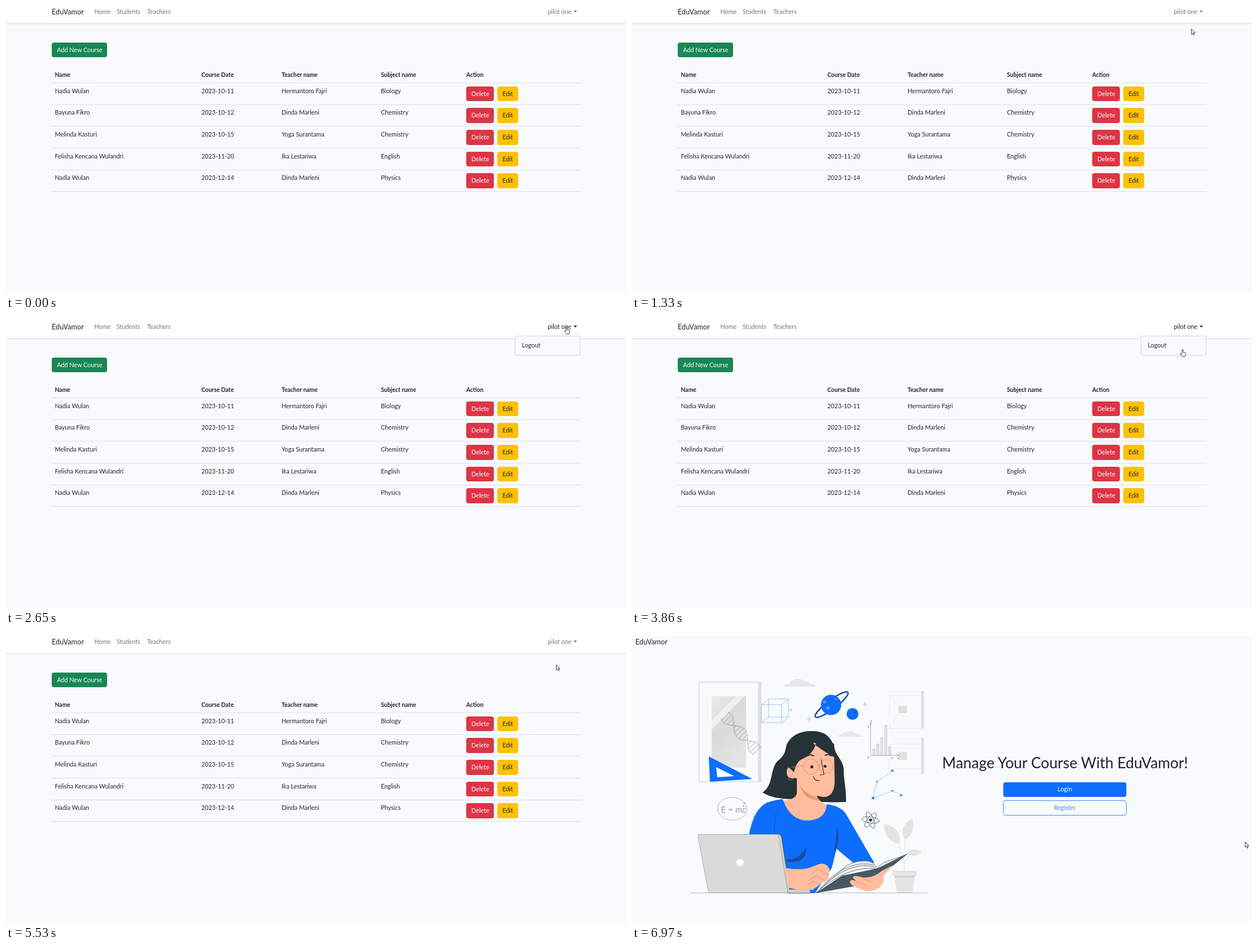
Write an HTML page that moves like this. It is 1098 by 510 pixels and loops after 7640 ms.

```html
<!DOCTYPE html>
<html lang="en">
<head>
<meta charset="utf-8">
<title>EduVamor</title>
<style>
  html, body { margin: 0; width: 100%; height: 100%; overflow: hidden; background: #f8fafc; }
  svg { display: block; width: 1098px; height: 510px; font: 10.8px Lato, sans-serif; }
  text { fill: #212529; white-space: pre; }
  .brand { font-size: 12.7px; }
  .muted { fill: #000; fill-opacity: .55; }
  .head { font-size: 10.4px; font-weight: bold; }
  .light { fill: #fff; }
  .pen { fill: none; stroke: #455a64; stroke-width: .8; stroke-linejoin: round; stroke-linecap: round; }
  .thin { stroke: #78868d; stroke-width: .6; }
  .faint { fill: none; stroke: #e8eaec; }
  .gray { fill: #e0e0e0; }
  .blue { fill: #0d6efd; }
  .navy { fill: #174da6; }
  .skin { fill: #ffbd9d; }
  .ink { fill: #263238; }
  .wire { fill: none; stroke: #5f9ffb; stroke-width: .6; }
  .pointer path { fill: #fff; stroke: #222831; stroke-width: .9; stroke-linejoin: round; }
</style>
</head>
<body>
<svg viewBox="0 0 1098 510">
  <defs>
    <linearGradient id="shade" x2="0" y2="1">
      <stop offset="0" stop-color="#000" stop-opacity=".08"/>
      <stop offset="1" stop-color="#000" stop-opacity="0"/>
    </linearGradient>
    <linearGradient id="glass" x2=".6" y2="1">
      <stop offset="0" stop-color="#ececec"/>
      <stop offset=".45" stop-color="#dadada"/>
      <stop offset="1" stop-color="#e4e4e4"/>
    </linearGradient>
  </defs>
  <rect width="1098" height="510" fill="#f8fafc"/>

  <g id="courses">
    <rect width="1098" height="30" fill="#fff"/>
    <rect y="30" width="1098" height="4" fill="url(#shade)"/>
    <text x="81" y="15" class="brand">EduVamor</text>
    <text x="156.5" y="14" class="muted">Home</text>
    <text x="196" y="14" class="muted">Students</text>
    <text x="250" y="14" class="muted">Teachers</text>
    <g id="account">
      <text x="959.5" y="14" style="fill:#000">pilot one</text>
      <path d="M1005.2 8.3h6.2l-3.1 3.2z"/>
    </g>
    <g id="table"></g>
    <g id="menu">
      <rect x="901.5" y="26.5" width="115" height="34.5" rx="4" fill="#f8fafc" stroke="#d0d3d6"/>
      <text x="913.5" y="47">Logout</text>
    </g>
  </g>

  <g id="welcome">
    <text x="6" y="15" class="brand">EduVamor</text>
    <text x="767" y="235" font-size="26.4" text-anchor="middle">Manage Your Course With EduVamor!</text>
    <rect x="657.5" y="260" width="218" height="26" rx="4" class="blue"/>
    <text x="766.5" y="276" text-anchor="middle" class="light">Login</text>
    <rect x="657.5" y="292.5" width="218" height="26" rx="4" fill="none" stroke="#3d8bfd"/>
    <text x="766.5" y="308.5" text-anchor="middle" style="fill:#3d8bfd">Register</text>

    <!-- wall -->
    <path class="faint" stroke-width="3" d="M118.500 82H228V259H118.500Z"/>
    <path class="gray" d="M223 82h6v177h-6z"/>
    <rect x="141" y="107" width="61" height="127" fill="url(#glass)"/>
    <path fill="#f0f0f0" d="M141 150l43-43h15l-58 59z"/>
    <path class="faint" d="M456 106h57v58h-57zM456 192h57v44h-57zM456 106l16 18M456 164l16-26M456 192l16 14"/>
    <path class="gray" d="M472 124h15v13h-15zM472 206h15v14h-15zM512 98h5v66h-5zM512 180h5v66h-5z"/>
    <path fill="#e7e8ea" d="M267 90q5-6 12-6 5-8 14-8 9 0 13 6 6-3 10 3 8 0 12 5zM364 179q5-5 9-5 5-6 12-5 7 0 9 4 9 0 14 6z"/>
    <path fill="#d5dade" d="M412.500 116l1.500 4 4 1.500-4 1.500-1.500 4-1.500-4-4-1.500 4-1.500zM314 142l1.300 4 4 1.300-4 1.300-1.300 4-1.300-4-4-1.300 4-1.300z"/>
    <path id="helix" class="pen thin"/>
    <path class="blue" fill-rule="evenodd" d="M136 214l77 40-75 5zM149 233l2 18 30-2z"/>
    <path class="wire" d="M229 122h36v32h-36zM242 112h35v32h-35zM229 122l13-10M265 122l12-10M265 154l12-10M229 154l13-10"/>
    <text x="279" y="134" font-size="9" font-style="italic" style="fill:#9dbdf0">n</text>

    <!-- planets -->
    <ellipse cx="353.500" cy="122" rx="36" ry="8" transform="rotate(-37 353.500 122)" fill="none" stroke="#174da6" stroke-width="2.600"/>
    <circle cx="352.500" cy="122.500" r="18" class="blue"/>
    <g fill="#5a9bff"><circle cx="341" cy="117" r="2.800"/><circle cx="347" cy="128" r="3"/><circle cx="360" cy="112" r="1.800"/></g>
    <circle cx="390.500" cy="138.500" r="10.500" class="blue"/>
    <g class="navy"><circle cx="396" cy="135" r="2"/><circle cx="388" cy="144" r="1.500"/></g>

    <!-- diagrams -->
    <path class="pen thin" d="M422.500 154v58H473M420.500 158l2-4 2 4M469 210l4 2-4 2M427 212v-11h3v11M434 212v-20h3v20M441 212v-31h3v31M448 212v-53h3v53M455 212v-15h3v15"/>
    <g font-size="5.500" opacity=".7"><text x="422" y="153">y</text><text x="417" y="163">1</text><text x="417" y="218">0</text><text x="459" y="219">4</text><text x="470" y="219">x</text></g>
    <path class="wire" d="M461 239.500L434 259 427 288 461 275 476.500 283"/>
    <g id="stars" class="blue"></g>
    <path class="pen thin" d="M152 309c-3-30 49-28 51-4 4 29-49 29-51 4z"/>
    <g font-weight="300" opacity=".75"><text x="157.500" y="313.500" font-size="15">E = mc</text><text x="195" y="303" font-size="9">2</text></g>
    <g class="pen" transform="translate(422.500 327)">
      <ellipse rx="15.500" ry="5.500" transform="rotate(8)"/>
      <ellipse rx="15.500" ry="5.500" transform="rotate(68)"/>
      <ellipse rx="15.500" ry="5.500" transform="rotate(128)"/>
      <circle r="2.500" class="ink"/>
    </g>

    <!-- plant and desk -->
    <path class="faint" stroke-width="1.500" d="M483 417Q479 380 463 348M483 417Q478 380 489 340M483 405Q484 390 500 385"/>
    <path fill="#e4e4e4" d="M474 369c-16 0-29-18-28-35 17 2 32 15 28 35zM483 361c-10-14 0-31 13-36 4 14 1 31-13 36zM486 388q10-14 27-5-10 12-27 5zM461 417h43v9h-43zM465 426h36l-4 31h-28z"/>
    <path fill="#cfcfcf" d="M465 426h36l-.5 3h-35z"/>
    <path d="M104 456.500H524" stroke="#a4abae" stroke-width=".8"/>

    <!-- reader -->
    <path class="ink" d="M231 278c20-12 13-42 27-56 15-12 13-20 16-29 8-18 27-25 46-24 23 0 34 12 39 32 3 13 15 20 16 36 0 21 5 38 4 58q-48 2-92-5-38 0-56-12z"/>
    <path class="skin" d="M292 248v32q-3 11-26 13 15 37 46 36 32-3 34-29-18-6-19-20z"/>
    <path fill="#eb9a72" d="M297 265q13 18 31 21l3 7q-27-2-34-28z"/>
    <path class="blue" d="M207 354q8-46 32-58 14-5 28-6 13 38 45 38 31-2 33-29 26 3 35 19l49 85-29 7-38-32-8 34-30 45h-47l-19-103z"/>
    <path class="navy" d="M271 397q26 2 37-23 3 28-26 28-8 0-11-5zM363 337q6 25-3 47l-2-7q4-13 5-40z"/>
    <path class="pen" style="stroke:#174da6" d="M253 352q-3-34 8-50M245 299q7-6 14-7"/>
    <path class="skin" d="M323 190q31 4 35 23l1 47q-2 27-20 26-22-2-40-26l-9-8q-16 4-16-10 0-11 11-10 17-13 23-36z"/>
    <path class="ink" d="M327 184q-3 25-26 35-10 4-14 23l-9-8 2-38 24-20zM320 190q19 15 39 26l-1-24-21-15z"/>
    <g class="pen" style="stroke:#cf9273">
      <circle cx="317" cy="232" r="13.500"/><circle cx="344" cy="232" r="12"/>
      <path d="M330 230q1-2 2 0M303 231l-20 2M278 239q6-1 7 7"/>
      <circle cx="281" cy="252" r="4"/>
    </g>
    <g class="ink"><circle cx="318.500" cy="232.500" r="2.700"/><circle cx="342" cy="231.500" r="2.600"/></g>
    <path class="pen" style="stroke:#263238;stroke-width:1.800" d="M308 214q7-5 14-1M342 212q6-3 11 1"/>
    <path class="pen" style="stroke:#263238;stroke-width:1.200" d="M335 220l5 26-7 1M321 249q2 9 11 8"/>

    <!-- laptop -->
    <path fill="#cfcfcf" d="M255 352h5q4 1 5 6l14 92h34q4 3 3 7h-40z" stroke="#37474f" stroke-width=".8"/>
    <path fill="#dadada" stroke="#8d969b" stroke-width=".7" d="M119 352.500H255q4 0 5 5l16 99H138q-2 0-3-4L117 357q0-4 2-4.500z"/>
    <circle cx="191.500" cy="402.500" r="6.300" fill="#fff"/>

    <!-- hands and book -->
    <path class="skin" d="M271 412q26 5 43 0l18-7q13-3 18 10l-2 16-13 9-15 11q-24 2-43-4z"/>
    <path class="pen" style="stroke:#db835f" d="M318 423l12-9 18 11M315 433l11-7 16 9M312 441l10-5 11 7"/>
    <path fill="#455a64" d="M325 457l47-31 62-13 53-25-44 36-45 20z"/>
    <path fill="#f1f2f1" stroke="#455a64" stroke-width=".8" d="M326 456l54-48q18-10 38-8 12 2 16 14-49-8-108 42zM434 414q5-10 22-15l31-11z"/>
    <path class="pen" d="M333 448q55-51 98-37M341 439q45-43 87-32M433 414l53-26"/>
    <path class="skin" d="M463 407l-17 18-1 13q-10 17-32 15l-8-3q-20-7-19-14 3-5 11 0l-6-7q2-5 18 0 18 2 34-12z"/>
    <path class="pen" style="stroke:#db835f" d="M397 436l17 6M407 430l17 7"/>
  </g>

  <g id="pointer" class="pointer">
    <path id="arrow" d="M.5.500v9.500l2.200-2 1.500 3.300 1.500-.7L4.200 7.300h2.900z"/>
    <path id="hand" d="M-1 7.500V1a1 1 0 0 1 2 0v4l3.600.7q1 .3.900 1.500L4.800 10.500 4 12.800H-.2L-3.500 8.400q-.6-1.600 1-1.300z"/>
  </g>
</svg>
<script>
const LOOP = 7640;
const $ = id => document.getElementById(id);
const label = (x, y, text, cls = "") => `<text x="${x}" y="${y}" class="${cls}">${text}</text>`;
// Buttons and rules sit on whole pixels, as boxes do in a page
const button = (x, y, width, color, text, cls) => {
  const top = Math.round(y), height = Math.round(y + 26.5) - top;
  return `<rect x="${x}" y="${top}" width="${width}" height="${height}" rx="4" fill="${color}"/>` +
    label(x + 9.2, y + 17, text, cls);
};
const rule = y => `<path d="M81 ${Math.floor(y) + .5}H1018" stroke="#dee2e6"/>`;

const columns = [86.5, 346, 488, 664, 815];
const courses = [
  ["Nadia Wulan", "2023-10-11", "Hermantoro Fajri", "Biology"],
  ["Bayuna Fikro", "2023-10-12", "Dinda Marleni", "Chemistry"],
  ["Melinda Kasturi", "2023-10-15", "Yoga Surantama", "Chemistry"],
  ["Felisha Kencana Wulandri", "2023-11-20", "Ika Lestariwa", "English"],
  ["Nadia Wulan", "2023-12-14", "Dinda Marleni", "Physics"]
];

const titles = ["Name", "Course Date", "Teacher name", "Subject name", "Action"];
$("table").innerHTML = button(81, 64.8, 98, "#198754", "Add New Course", "light") +
  titles.map((title, i) => label(columns[i], 125.5, title, "head")).join("") + rule(136.5) +
  courses.map((course, row) => {
    const y = 136.5 + row * 38.65;
    return course.map((value, i) => label(columns[i], y + 18.3, value)).join("") +
      button(815, y + 6.3, 49, "#dc3545", "Delete", "light") +
      button(870, y + 6.3, 37, "#ffc107", "Edit") + rule(y + 38.65);
  }).join("");

// Two crossing strands with rungs, along a diagonal
const strand = (s, side) => {
  const swing = side * 10 * Math.sin(7.3 * s - 2.1);
  return `${(164 + 57 * s + swing * .72).toFixed(1)} ${(141 + 63 * s - swing * .7).toFixed(1)}`;
};
const steps = Array.from({ length: 41 }, (_, i) => i / 40);
$("helix").setAttribute("d", [1, -1].map(side => "M" + steps.map(s => strand(s, side)).join("L")).join("") +
  steps.filter((_, i) => i % 3 === 1).map(s => `M${strand(s, 1)}L${strand(s, -1)}`).join(""));

const starShape = (x, y, r) => "M" + Array.from({ length: 10 }, (_, i) => {
  const a = i * Math.PI / 5 - Math.PI / 2, d = i % 2 ? r * .45 : r;
  return `${x + d * Math.cos(a)} ${y + d * Math.sin(a)}`;
}).join("L") + "Z";
$("stars").innerHTML = [[461, 239.5, 3], [434, 259, 2.2], [427, 288, 3.4], [461, 275, 2.2], [476.5, 283, 2.8]]
  .map(star => `<path d="${starShape(...star)}"/>`).join("");

// Pointer path: time, x, y
const path = [
  [680, 1038, 474], [740, 1010, 430], [800, 982, 376], [870, 977, 186], [930, 979, 114],
  [1000, 980, 104], [1200, 986, 68], [1390, 992, 28], [1460, 993, 10.5], [2780, 993, 10.5],
  [2980, 975, 50.5], [4010, 975, 50.5], [4011, 974, 50.5], [6420, 974, 50.5],
  [6560, 1018, 143], [6700, 1076, 290], [6830, 1087, 335], [6970, 1085.5, 365.5]
];
const pointerAt = t => {
  const next = path.findIndex(p => p[0] > t);
  if (next < 0) return path.at(-1).slice(1);
  const [t1, x1, y1] = path[next], [t0, x0, y0] = path[Math.max(0, next - 1)];
  const k = t1 > t0 ? (t - t0) / (t1 - t0) : 0;
  return [x0 + (x1 - x0) * k, y0 + (y1 - y0) * k];
};

const fade = (t, start) => Math.min(1, Math.max(0, (t - start) / 150));
const show = (id, on) => $(id).style.display = on ? "" : "none";

function draw(now) {
  const t = now % LOOP;
  const onLink = t >= 1460 && t < 4010;
  show("courses", t < 6420);
  show("welcome", t >= 6420);
  show("menu", t >= 2320 && t < 4010);
  show("pointer", t >= 680);
  show("hand", onLink);
  show("arrow", !onLink);
  $("account").setAttribute("opacity", .55 + .15 * fade(t, 1460) + .2 * fade(t, 2320) - .35 * fade(t, 4010));
  $("pointer").setAttribute("transform", `translate(${pointerAt(t)})`);
  requestAnimationFrame(draw);
}
requestAnimationFrame(draw);
</script>
</body>
</html>
```
